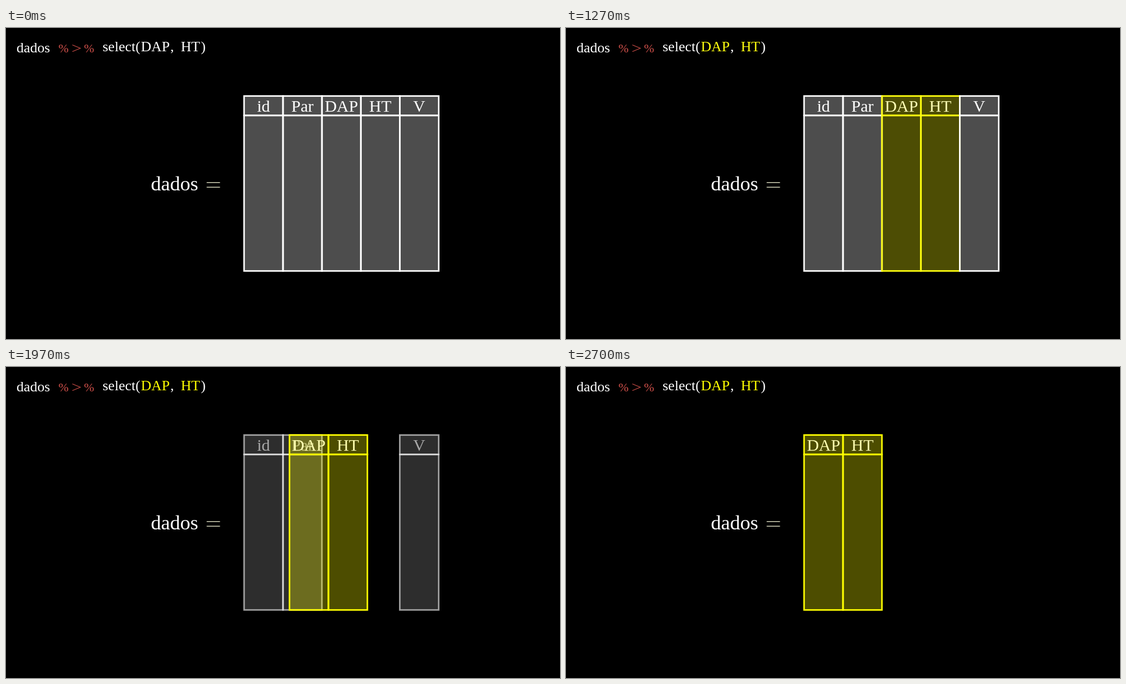
Animation of 998 by 561 pixels, one loop 3510 ms. Source, as an HTML page with a canvas:

```html
<!DOCTYPE html>
<html lang="pt">
<head>
<meta charset="utf-8">
<title>dados %&gt;% select(DAP, HT)</title>
<style>
  html, body { margin: 0; width: 100%; height: 100%; overflow: hidden; background: #000; }
  canvas { display: block; }
</style>
</head>
<body>
<canvas id="stage" width="998" height="561"></canvas>
<script>
const ctx = document.getElementById('stage').getContext('2d');
const LOOP = 3510;
const UNIT = 561 / 8;            // one table column is one unit wide
const TABLE_LEFT = 499 - UNIT;
const TABLE_TOP = 122.7;
const HEADER = UNIT / 2;
const BODY = UNIT * 4;
const RED = '#d0504a';

const clamp = x => Math.min(1, Math.max(0, x));
const sigmoid = x => 1 / (1 + Math.exp(-x));

// Normalised sigmoid easing
function smooth(t) {
  const edge = sigmoid(-5);
  return clamp((sigmoid(10 * (clamp(t) - 0.5)) - edge) / (1 - 2 * edge));
}

function text(str, x, y, size, color = '#fff', align = 'left') {
  ctx.font = `${size}px "Liberation Serif", "Times New Roman", serif`;
  ctx.textAlign = align;
  ctx.fillStyle = color;
  ctx.fillText(str, x, y);
}

function polyline(points, color, width) {
  ctx.strokeStyle = color;
  ctx.lineWidth = width;
  ctx.beginPath();
  points.forEach(([x, y]) => ctx.lineTo(x, y));
  ctx.stroke();
}

function cell(x, y, height, color, alpha) {
  ctx.fillStyle = ctx.strokeStyle = color;
  ctx.lineWidth = 2.8;
  ctx.globalAlpha = alpha * 0.3;
  ctx.fillRect(x, y, UNIT, height);
  ctx.globalAlpha = alpha;
  ctx.strokeRect(x, y, UNIT, height);
}

// The label lies under the translucent cell, so the fill tints it
function column(label, slot, color, alpha = 1) {
  const x = TABLE_LEFT + slot * UNIT;
  ctx.globalAlpha = alpha;
  text(label, x + UNIT / 2, TABLE_TOP + 28, 30, '#fff', 'center');
  cell(x, TABLE_TOP, HEADER, color, alpha);
  cell(x, TABLE_TOP + HEADER, BODY, color, alpha);
  ctx.globalAlpha = 1;
}

function drawCode(highlight) {
  text('dados', 19, 44, 25.9);
  text('%', 94.5, 43.5, 22, RED);
  polyline([[119.5, 30.5], [134, 36.5], [119.5, 42.5]], RED, 1.1);
  text('%', 140.5, 43.5, 22, RED);
  text('select(', 174, 42, 26);
  text('DAP', 243, 42, 26, highlight);
  text(',', 296, 42, 26);
  text('HT', 315, 42, 26, highlight);
  text(')', 351, 42, 26);
}

function drawEquation() {
  text('dados', 261, 292.8, 36.6);
  for (const y of [278.8, 287.2]) polyline([[361.5, y], [385.5, y]], '#e6e6c8', 1.4);
}

function draw(ms) {
  const frame = Math.floor(ms * 0.03 + 0.11);   // 30 steps per second
  const tint = smooth((frame - 15) / 30);
  const move = smooth((frame - 45) / 30);
  const highlight = `rgb(255, 255, ${Math.round(255 * (1 - tint))})`;

  ctx.fillStyle = '#000';
  ctx.fillRect(0, 0, 998, 561);
  drawCode(highlight);
  drawEquation();

  const dropped = (label, slot) => column(label, slot, '#fff', 1 - move);
  const kept = () => {
    column('DAP', 2 - 2 * move, highlight);
    column('HT', 3 - 2 * move, highlight);
  };
  const moving = frame >= 45;    // selected columns come to the front
  dropped('id', 0);
  dropped('Par', 1);
  if (!moving) kept();
  dropped('V', 4);
  if (moving) kept();
}

function tick() {
  draw(performance.now() % LOOP);
  requestAnimationFrame(tick);
}
tick();
</script>
</body>
</html>
```
